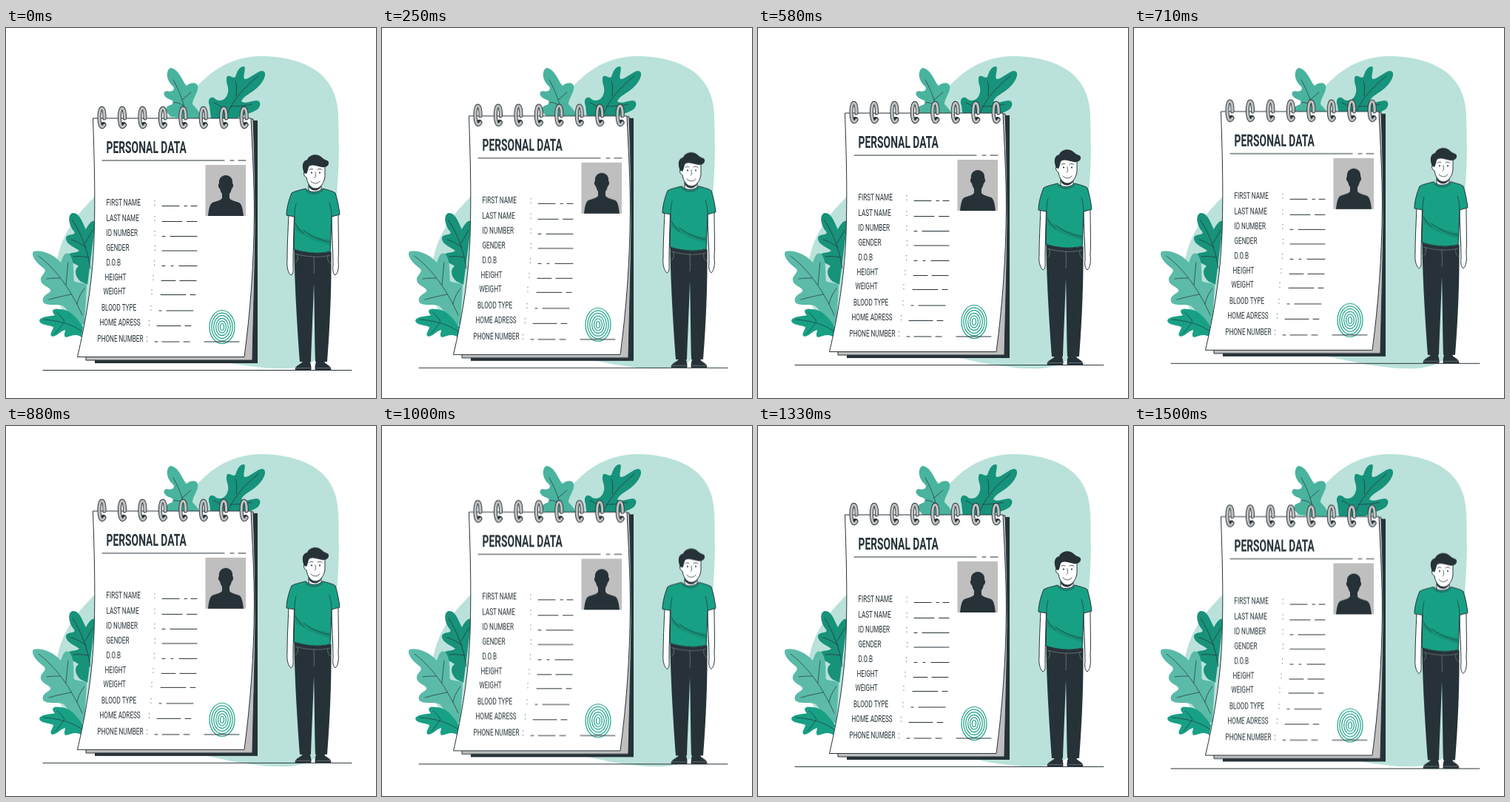
Recreate the animation shown at these times as an HTML page. Size 500 px wide and 500 px high, loop 1.54 s.

```html
<!DOCTYPE html>
<html lang="en">
<head>
<meta charset="utf-8">
<title>Personal data</title>
<style>
  html, body { margin: 0; height: 100%; overflow: hidden; background: #fff; }
  svg { display: block; width: 100vw; height: 100vh; }

  .line { fill: none; stroke: #263238; stroke-linecap: round; stroke-linejoin: round; }
  .vein { stroke-width: .7; }
  .edge { stroke: #263238; stroke-width: 1; stroke-linejoin: round; }
  .dark { fill: #263238; }
  .gray { fill: #bfbfbf; }
  .teal { fill: #18a085; }
  .white { fill: #fff; }
  .seam { fill: none; stroke: #8b9498; stroke-width: .6; }
  text { font-family: Roboto, "Liberation Sans", sans-serif; fill: #263238; }
  .title { font-size: 22px; font-weight: 700; }
  .row { font-size: 12px; }

  .float { animation: float 1540ms infinite; }
  /* 37 equal ticks: 17 rising, 19 falling, one at rest */
  @keyframes float {
    0% { transform: translateY(0); animation-timing-function: steps(17); }
    45.946% { transform: translateY(-9.2px); animation-timing-function: steps(19); }
    97.297% { transform: translateY(.5px); animation-timing-function: step-end; }
    100% { transform: translateY(0); }
  }
</style>
</head>
<body>
<svg viewBox="0 0 500 500">
  <path fill="#bae2da" d="M350 38C320 37 290 47 265 72C225 110 165 180 120 228C85 262 70 290 66 335C62 385 100 425 200 435C270 442 290 452 330 457C380 464 420 462 432 430C440 400 436 340 441 290C446 240 449 210 450 165C449 130 451 110 444 90C432 55 395 40 350 38Z"/>

  <g id="leaves">
    <path fill="#49b39e" d="M222 54C215 58 217 72 226 79C229 84 224 87 217 85C211 86 213 93 220 96C228 98 228 103 220 105C213 108 217 116 224 120L262 124C264 115 257 108 252 103C252 95 261 86 259 78C257 72 248 74 244 78C238 72 234 55 222 54Z"/>
    <path class="line vein" d="M226 70C234 84 241 102 244 122M238 97L250 87M240 105C234 101 230 100 225 101"/>
    <path fill="#17927b" d="M322 52C315 51 312 60 310 66C307 70 299 60 298 68C297 76 303 82 299 90C296 99 286 100 282 95C276 91 272 97 275 105L277 122H312C322 116 334 115 341 109C345 103 344 98 338 98C331 99 322 103 318 99C322 90 334 88 344 76C352 66 352 57 345 58C339 59 330 68 324 69C318 70 325 55 322 52Z"/>
    <path class="line vein" d="M341 65C322 80 306 97 297 122M311 92C312 82 312 76 310 72M303 106C314 106 324 105 332 103M299 116C292 107 287 103 281 101"/>
    <path fill="#18927a" d="M90 250C83 252 84 265 92 275C96 281 82 277 81 284C81 293 95 297 99 301C94 305 85 302 83 308C83 316 94 318 98 322C92 326 93 335 100 342L110 347L121 262C116 257 110 268 108 272C103 262 99 249 90 250Z"/>
    <path class="line vein" d="M90 260C101 277 110 298 114 325M107 291C111 284 114 278 117 273M112 310C103 309 97 308 91 309M108 296C101 291 95 288 88 286"/>
    <path fill="#5bbba8" d="M37 302C33 308 42 318 50 324C58 330 46 333 47 341C49 350 62 350 60 356C56 360 48 362 50 370C54 377 70 372 78 376L100 402L106 400L109 348C106 343 96 345 92 342C91 331 93 313 85 305C78 302 76 312 74 317C68 309 50 298 37 302Z"/>
    <path class="line vein" d="M44 308C66 325 86 350 103 388M73 338C67 338 61 338 55 339M81 347C82 337 83 326 84 317M88 360C78 362 68 364 58 367M96 373C98 364 102 357 106 352"/>
    <path class="teal" d="M45 395C48 389 60 390 66 388C60 382 64 378 72 380C84 380 92 386 104 404L102 418C96 412 86 417 81 418C77 416 80 411 80 408C74 409 70 416 63 417C57 415 64 408 64 404C58 401 46 402 45 395Z"/>
    <path class="line vein" d="M51 394C70 395 89 400 103 410M79 397C76 391 73 388 69 385M78 398C74 404 71 408 67 412"/>
  </g>

  <g class="float">
    <path class="line" d="M50 462.5H467"/>

    <g id="pad">
      <path class="dark" d="M326 125H340V453H120V446Z"/>
      <path class="gray edge" d="M326 123H334C336 170 337 230 337 270C336 340 334 400 333 449H108V440Z"/>
      <path class="white edge" d="M117.500 122H331C333 165 335.500 210 335.500 250C335 320 330 385 322 444.500H96.500C107 400 117 345 119 285C121 225 119 170 117.500 122Z"/>
      <g id="rings"></g>
      <path class="line" d="M130 179H295M303 179H308M314 179H324"/>
      <path class="gray" d="M269.500 185H324V254H269.500Z"/>
      <path class="dark" d="M297 199C303 199 307 204 306 210C308 211 307 216 305 217C304 221 303 223 302 224V230C304 233 310 234 315 236C319 238 320 246 321 254H273C274 246 275 238 279 236C284 234 290 233 292 230V224C291 223 290 221 289 217C287 216 286 211 288 210C287 204 291 199 297 199Z"/>
      <g id="rows"></g>
      <g id="print" fill="none" stroke="#18a085" stroke-width="1.200"></g>
      <path class="line" d="M268 424H315"/>
    </g>

    <g id="man">
      <path class="white edge" d="M382 252C381 275 380 295 380 313C379 322 381 331 385 334C389 333 388 326 388 320C388 300 389 275 389.500 254ZM449 252C449 275 450 295 449 313C450 322 449 331 445 334C442 332 441 327 442 320C442 300 440 275 440 254Z"/>
      <path class="white edge" d="M401 447H410V455H401ZM420 447H430V455H420Z"/>
      <path class="dark" d="M389.500 299C404 304 424 306 439.500 302C440 350 438 400 434 451H418C417 420 417 380 416 345C415 380 413 420 412 451H397C394 410 390 350 389.500 299Z"/>
      <path class="seam" d="M391 305C404 309 424 311 438 307M416 309C416 318 417 325 416 332M394 306C395 312 394 315 391 317M435 308C434 313 436 317 439 318"/>
      <path class="dark edge" d="M391 461.500C391 456 399 455 402 450.500H410C412 455 412 458 412 461.500ZM418 461.500C418 457 418 454 420 450.500H429C431 455 439 456 439 461.500Z"/>
      <path class="seam" d="M392 459.500H411M419 459.500H438"/>

      <path class="white edge" d="M409 205V216C409 221 411 224 417 224C423 224 426 221 426 216V205Z"/>
      <path class="dark" d="M409 211C413 218 421 219 426 213C424 221 413 222 409 214Z"/>
      <path class="teal edge" d="M405 217C411 223 421 223 428 217C435 219 441 220 445 223C448 232 450 243 451 252L440 255L438 302C420 306 404 304 389 299L390 255L379 253C379 243 383 230 386 223C391 220 398 219 405 217Z"/>
      <path fill="#138770" d="M391 266C402 276 418 283 438 286V294C420 289 402 282 391 272Z" opacity=".55"/>
      <path class="line vein" d="M390 255C390 247 391 242 392 237M440 255C440 248 439 242 437 236M402 273C410 280 424 287 437 289M391 264C394 270 398 274 402 278M405 219.500C411 225.500 421 225.500 428 219.500"/>

      <path class="white edge" d="M405 184V193C402 192 401 200 406 202C407 210 412 217 418 217C425 217 430 209 431 201V184C424 176 410 176 405 184Z"/>
      <path class="dark" d="M403 196C400 189 399 180 407 178C410 170 422 169 427 175C431 179 434 178 436 181C437 186 432 189 427 188C420 187 412 183 409 188C408 192 407 196 406 197Z"/>
      <path class="line" stroke-width=".8" d="M410 191.500C412 190 414 190 415 191M421 191C423 190 425 190 427 191.500M418 195C418 199 420 201 417 202M412 207C415 211 422 211 424 207"/>
      <circle class="dark" cx="413" cy="195.500" r="1.100"/>
      <circle class="dark" cx="424" cy="195.500" r="1.100"/>
    </g>
  </g>
</svg>

<script>
  const NS = 'http://www.w3.org/2000/svg';

  function add(parent, tag, attrs, content = '') {
    const el = document.createElementNS(NS, tag);
    for (const key in attrs) el.setAttribute(key, attrs[key]);
    el.textContent = content;
    document.getElementById(parent).append(el);
  }

  // Condensed lettering: one horizontal scale per style
  const narrow = { title: .63, row: .68 };
  function write(style, x, y, content) {
    const transform = `translate(${x} ${y}) scale(${narrow[style]} 1)`;
    add('rows', 'text', { class: style, transform }, content);
  }

  const ring = 'M3.5 122C4 104 -3.500 104 -3.500 120C-3.500 133 0 137 3.500 131';
  for (let i = 0; i < 8; i++) {
    const x = 129.500 + i * 27.450;
    const transform = `translate(${x} 0)`;
    add('rings', 'circle', { class: 'dark', cx: x + 2, cy: 130.5, r: 3.6 });
    add('rings', 'path', { class: 'line', d: ring, transform, 'stroke-width': 5 });
    add('rings', 'path', { class: 'line', d: ring, transform, style: 'stroke:#bfbfbf;stroke-width:3.2' });
  }

  write('title', 135.5, 169, 'PERSONAL DATA');

  // label, centre y, label x, colon x, dash ends
  const rows = [
    ['FIRST NAME', 236, 135.5, 200, [211, 234, 241, 244.5, 250, 258]],
    ['LAST NAME', 257, 135.5, 200, [211, 238, 244.5, 258]],
    ['ID NUMBER', 277, 135.5, 200, [211, 215, 222, 258]],
    ['GENDER', 296.5, 135.5, 200.5, [211, 258]],
    ['D.O.B', 317, 135.5, 199.5, [211, 215, 223, 226, 234, 258]],
    ['HEIGHT', 337, 133.5, 198, [210, 229, 235, 257]],
    ['WEIGHT', 356, 131.5, 196, [209, 243, 249, 256]],
    ['BLOOD TYPE', 377.5, 129, 195, [207, 210, 217, 253]],
    ['HOME ADRESS', 398, 126.5, 192.5, [204, 236, 242, 250]],
    ['PHONE NUMBER', 419.5, 123.5, 189.5, [201, 205, 211, 234, 240, 248]]
  ];
  for (const [label, y, x, colon, ends] of rows) {
    write('row', x, y + 4.3, label);
    write('row', colon, y + 4.3, ':');
    let d = '';
    ends.forEach((end, i) => d += i % 2 ? `H${end}` : `M${end} ${y + 4.5}`);
    add('rows', 'path', { class: 'line', d });
  }

  for (let i = 0; i < 6; i++) {
    add('print', 'ellipse', { cx: 292, cy: 404, rx: 17 - i * 2.9, ry: 22.5 - i * 3.6 });
  }
</script>
</body>
</html>
```
